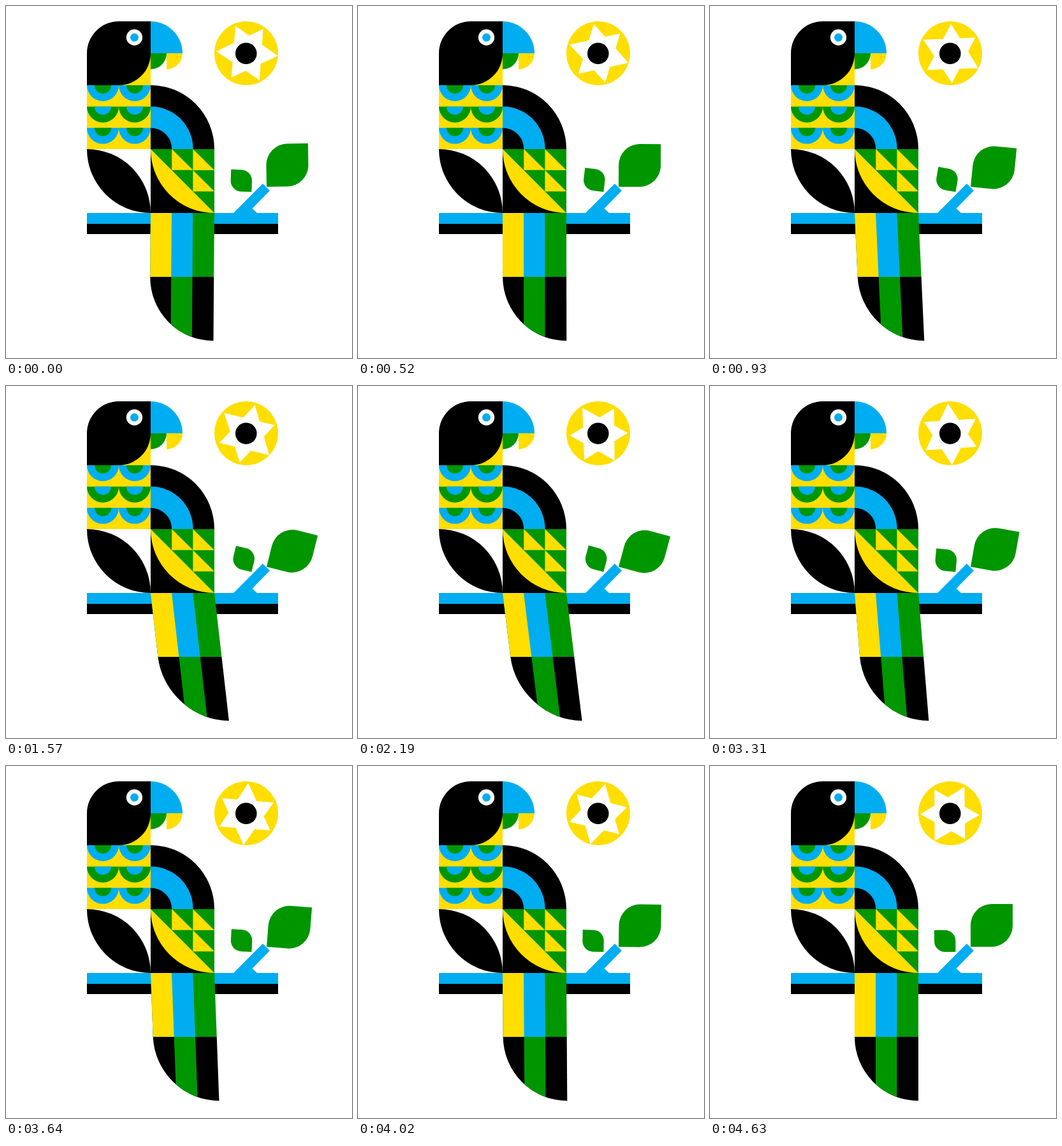
An HTML page for the animation above (4680 ms loop, 543 by 551 pixels).

```html
<!DOCTYPE html>
<html lang="en">
<head>
<meta charset="utf-8">
<title>Parrot on a branch</title>
<style>
  html, body { margin: 0; width: 100%; height: 100%; overflow: hidden; background: #fff; }
  svg { display: block; width: 543px; height: 551px; }
  .blue { fill: #00adf0; }
  .green { fill: #009600; }
  .yellow { fill: #ffde00; }
  .white { fill: #fff; }
</style>
</head>
<body>
<svg viewBox="0 0 543 551">
  <!-- sun -->
  <circle class="yellow" cx="377" cy="74" r="50"/>
  <path id="star" class="white" d="M-46.9-3 26.6-37.9 20.9 41.9zM-16.9-42.8 49.6 4-23.2 38.1z"/>
  <circle cx="376.8" cy="74.3" r="16.8"/>

  <!-- chest and head -->
  <path class="yellow" d="M177 74h50v150H127V124h50z"/>
  <path d="M127 124V74a50 50 0 0 1 50-50h50v50a50 50 0 0 1-50 50z"/>
  <circle class="white" cx="201.5" cy="49.2" r="12.6"/>
  <circle class="blue" cx="201.5" cy="49.2" r="6.4"/>
  <path class="blue" d="M227 24a50 50 0 0 1 50 50h-50z"/>
  <path class="green" d="M227 74h25a25 25 0 0 1-25 25z"/>
  <path class="yellow" d="M252 74h25a25 25 0 0 1-25 25z"/>
  <g id="scales"></g>

  <!-- wing -->
  <path d="M227 124a100 100 0 0 1 100 100H227z"/>
  <path class="blue" d="M227 157.3a66.7 66.7 0 0 1 66.7 66.7H227z"/>
  <path d="M227 190.7a33.3 33.3 0 0 1 33.3 33.3H227z"/>
  <path d="M127 224a100 100 0 0 1 100 100a100 100 0 0 1-100-100z"/>
  <path d="M227 224h100v100H227z"/>
  <path class="yellow" d="M227 224h100v100a100 100 0 0 1-100-100z"/>
  <path class="green" d="M227 224h100v100z"/>
  <path class="yellow" d="M260.3 224v32.7h33zM293.4 224v33H327zM293.4 257v33.3H327z"/>

  <!-- branch and leaves -->
  <path d="M127 340h300v17H127z"/>
  <path class="blue" d="M127 324h230l46-46 11 11-27.5 28 7.500 7H427v17H127z"/>
  <path id="bigLeaf" class="green" d="M409 283v-33.500a33.300 33.300 0 0 1 33.300-33.500H475v33.500a33.300 33.300 0 0 1-33.300 33.500z"/>
  <path id="smallLeaf" class="green" d="M352 257h16.700a16.700 16.700 0 0 1 16.700 16.700V291h-16.700a16.700 16.700 0 0 1-16.700-16.700z"/>

  <!-- tail, hinged on the top of the branch -->
  <g id="tail">
    <path class="green" d="M227 324h100v100H227z"/>
    <path class="blue" d="M227 324h66.300v100H227z"/>
    <path class="yellow" d="M227 324h33v100h-33z"/>
    <path d="M227 424h100v100a100 100 0 0 1-100-100z"/>
    <path class="green" d="M260 424V498.300A100 100 0 0 0 293.300 518.200V424z"/>
  </g>
</svg>
<script>
  const LOOP = 4680;    // the loop shows a little less than one full sway
  const SWAY = 4840;
  const LEAD = SWAY - 4630;
  const byId = id => document.getElementById(id);
  const move = (id, transform) => byId(id).setAttribute('transform', transform);

  const halfDisc = (x, y, r, color) =>
    `<path class="${color}" d="M${x - r} ${y}h${2 * r}a${r} ${r} 0 0 1 ${-2 * r} 0z"/>`;

  let scales = '';
  for (let row = 0; row < 3; row++) {
    const colors = row === 1 ? ['green', 'blue'] : ['blue', 'green'];
    for (const x of [152, 202]) {
      const y = 124 + row * 33.4;
      scales += halfDisc(x, y, 25, colors[0]) + halfDisc(x, y, 13, colors[1]);
    }
  }
  byId('scales').innerHTML = scales;

  const bezier = (a, b, s) =>
    3 * a * s * (1 - s) ** 2 + 3 * b * s * s * (1 - s) + s ** 3;

  // winds up, swings across, and settles with a slight overshoot
  function swing(u) {
    let low = 0, high = 1;
    for (let i = 0; i < 24; i++) {
      const mid = (low + high) / 2;
      if (bezier(0.5, 0.45, mid) < u) low = mid; else high = mid;
    }
    return bezier(-0.45, 1.2, low);
  }

  const easeOut = u => Math.sin(u * Math.PI / 2);

  // there and back, each half with the same easing
  function sway(ease, time) {
    const u = Math.min(time / (SWAY / 2), 2);
    return u < 1 ? ease(u) : 1 - ease(u - 1);
  }

  function draw(now) {
    const t = now % LOOP;
    const swung = sway(swing, t + LEAD);
    move('star', `translate(377 74) rotate(${t * 120 / SWAY})`);
    move('tail', `translate(0 324) skewX(${7 * swung}) translate(0 -324)`);
    move('bigLeaf', `rotate(${15 * swung} 409 283)`);
    move('smallLeaf', `rotate(${15 * sway(easeOut, t + LEAD)} 385 291)`);
  }

  const start = performance.now();
  function tick() {
    draw(performance.now() - start);
    requestAnimationFrame(tick);
  }
  tick();
</script>
</body>
</html>
```
